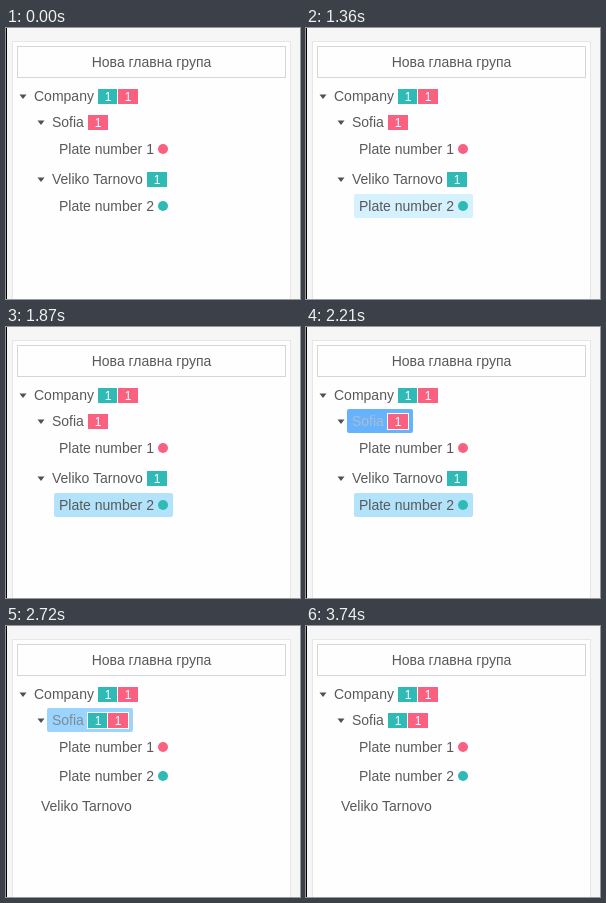
An HTML page for the animation above (4080 ms loop, 294 px wide and 271 px high).

```html
<!DOCTYPE html>
<html lang="uk">
<head>
<meta charset="utf-8">
<title>Tree drag and drop</title>
<style>
  html, body { margin: 0; width: 100%; height: 100%; overflow: hidden; background: #f6f6f6; }
  svg { display: block; width: 294px; height: 271px; }
  text { font: 14px "Liberation Sans", Arial, sans-serif; fill: #595959; }
  .count { font-size: 12px; fill: #fff; text-anchor: middle; }
</style>
</head>
<body>
<svg viewBox="0 0 294 271" xmlns="http://www.w3.org/2000/svg">
  <rect width="294" height="271" fill="#f6f6f6"/>
  <rect width="1" height="271" fill="#000"/>
  <rect x="6.5" y="13.5" width="278" height="270" fill="#fefefe" stroke="#e6e6e6"/>
  <rect x="11.5" y="18.5" width="268" height="31" fill="#fefefe" stroke="#d6d6d6"/>
  <text x="145.5" y="39" text-anchor="middle">Нова главна група</text>
  <g id="tree"></g>
</svg>
<script>
const LOOP = 4080, DROP = 2720;
const TEAL = '#2fbab5', PINK = '#fa6180', TEXT = '#595959';
const tree = document.getElementById('tree');

// [start, fill] and, for the drop target, [start, fill, label colour]
const plateSteps = [
  [0, 'none'], [850, '#f1fafe'], [1020, '#e6f7ff'], [1360, '#d4f1fd'],
  [1530, '#b7e5fc'], [1700, '#b2e3fb'], [DROP, 'none']
];
const targetSteps = [
  [0, 'none', TEXT], [2210, '#67b2fc', '#a9bdd3'], [2380, '#48a7ff', '#d8ebfd'],
  [DROP, '#9bd4fd', '#7d8c99'], [2890, '#e2f5ff', '#5c5d5e'],
  [3060, '#e6f7ff', TEXT], [3570, '#f3fbff', TEXT], [3740, 'none', TEXT]
];

const stepAt = (steps, t) => steps.filter(s => s[0] <= t).pop();

const label = (x, y, str, fill = TEXT) => `<text x="${x}" y="${y}" style="fill:${fill}">${str}</text>`;
const caret = (x, y) => `<path d="M${x - 3.5} ${y - 6.5}h7l-3.5 4.5z" fill="#505050"/>`;
const dot = (y, fill) => `<circle cx="157" cy="${y - 5}" r="5" fill="${fill}"/>`;
const glow = (x, y, w, fill) =>
  `<rect x="${x}" y="${y - 17}" width="${w}" height="24" rx="2" fill="${fill}"/>`;

function badges(x, y, fills) {
  return fills.map((fill, i) => {
    const left = x + i * 20;
    return `<rect x="${left - 1}" y="${y - 13}" width="22" height="17" fill="#fefefe"/>` +
      `<rect x="${left}" y="${y - 12}" width="20" height="15" fill="${fill}"/>` +
      `<text class="count" x="${left + 10}" y="${y}">1</text>`;
  }).join('');
}

function plate(n, y, fill, back = 'none') {
  return glow(48, y, 119, back) + label(53, y, 'Plate number ' + n) + dot(y, fill);
}

function render(t) {
  const moved = t >= DROP;
  const [, plateFill] = stepAt(plateSteps, t);
  const [, targetFill, targetText] = stepAt(targetSteps, t);
  const sofia = moved ? [TEAL, PINK] : [PINK];

  return caret(17, 73) + label(28, 73, 'Company') + badges(92, 73, [TEAL, PINK]) +
    caret(35, 99) + glow(41, 99, 46 + 20 * sofia.length, targetFill) +
    label(46, 99, 'Sofia', targetText) + badges(82, 99, sofia) +
    plate(1, 126, PINK) +
    (moved
      ? plate(2, 155, TEAL) + label(35, 185, 'Veliko Tarnovo')
      : caret(35, 156) + label(46, 156, 'Veliko Tarnovo') + badges(141, 156, [TEAL]) +
        plate(2, 183, TEAL, plateFill));
}

let shown = '';
function tick() {
  const markup = render(performance.now() % LOOP);
  if (markup !== shown) tree.innerHTML = shown = markup;
  requestAnimationFrame(tick);
}
tick();
</script>
</body>
</html>
```
